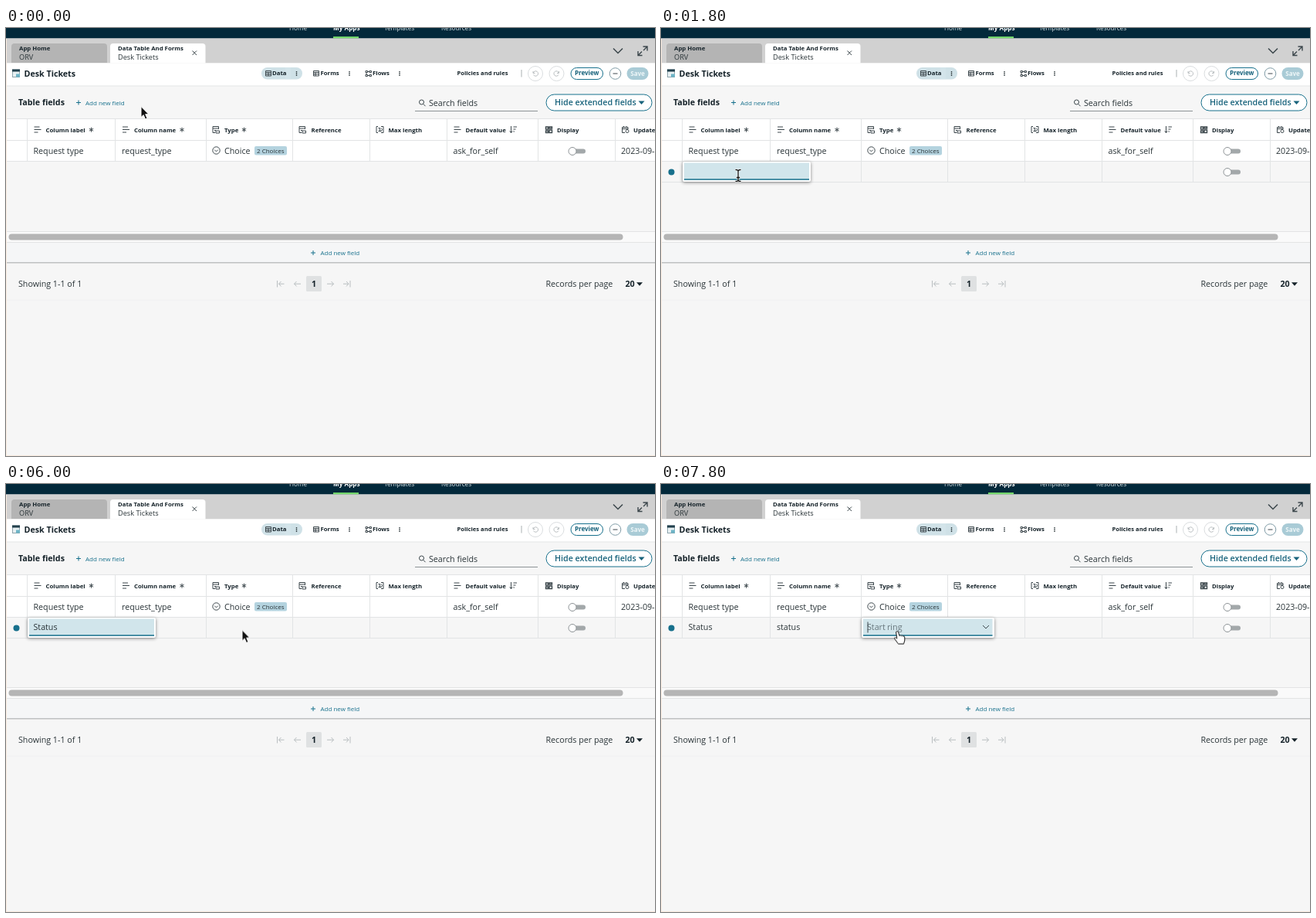
These frames come from a looping animation (841 by 554 pixels, 8000 ms). An HTML page:

```html
<!DOCTYPE html>
<html lang="en">
<head>
<meta charset="utf-8">
<title>Table fields</title>
<style>
html, body { margin: 0; width: 100%; height: 100%; overflow: hidden; background: #f6f6f6; }
svg { display: block; }
text { font: 10.7px "Open Sans", "Noto Sans", sans-serif; fill: #2a3438; white-space: pre; }
.bold { font-weight: 700; fill: #16232a; }
.semi { font-weight: 600; }
.small { font-size: 7.8px; }
.link, .link text { font-size: 8px; fill: #17708c; }
.tab { font-size: 9.2px; }
.nav { font-size: 8.2px; fill: #d5dfe3; }
.line { fill: none; stroke: #3c474c; stroke-width: 1; }
.teal { stroke: #17708c; }
.pale { stroke: #b9bec0; }
.grid { fill: none; stroke: #e2e4e5; }
.lift { filter: drop-shadow(0 1px 2px #0007); }

/* every part shares one 8 s clock; 2.5% is one 200 ms tick */
.anim, .pointer { animation: 8s step-end infinite; }
.row { animation-name: row; }
.label-box { animation-name: label-box; }
.label-caret { animation-name: label-caret; }
.st { animation-name: st; }
.at { animation-name: at; }
.u { animation-name: u; }
.e { animation-name: e; }
.s { animation-name: s; }
.type-box { animation-name: type-box; }
.type-caret { animation-name: type-caret; }
.hint { animation-name: hint; }
.picked { animation-name: picked; }
.loading { animation-name: loading; }
.name { animation-name: name; }
.arrow { animation-name: arrow; }
.hand { animation-name: hand; }
.beam { animation-name: beam; }
.pointer { animation-name: pointer; }
.spin { animation: spin .8s steps(4) infinite; }

@keyframes row { 0% { visibility: hidden } 15% { visibility: visible } }
@keyframes label-box { 0% { visibility: hidden } 15% { visibility: visible } 80%, 100% { visibility: hidden } }
@keyframes label-caret { 0% { visibility: hidden } 15% { visibility: visible } 22.5%, 100% { visibility: hidden } }
@keyframes st { 0% { visibility: hidden } 27.5% { visibility: visible } }
@keyframes at { 0% { visibility: hidden } 32.5% { visibility: visible } }
@keyframes u { 0% { visibility: hidden } 40% { visibility: visible } }
@keyframes e { 0% { visibility: hidden } 45% { visibility: visible } 55%, 100% { visibility: hidden } }
@keyframes s { 0% { visibility: hidden } 60% { visibility: visible } }
@keyframes type-box { 0% { visibility: hidden } 80% { visibility: visible } }
@keyframes type-caret { 0% { visibility: hidden } 80% { visibility: visible } 87.5% { visibility: hidden } 92.5% { visibility: visible } }
@keyframes hint { 0% { visibility: hidden } 80% { visibility: visible } 97.5%, 100% { visibility: hidden } }
@keyframes picked { 0% { visibility: hidden } 97.5% { visibility: visible } }
@keyframes loading { 0% { visibility: hidden } 80% { visibility: visible } 92.5%, 100% { visibility: hidden } }
@keyframes name { 0% { visibility: hidden } 92.5% { visibility: visible } }
@keyframes arrow {
  0% { visibility: visible } 10% { visibility: hidden }
  17.5% { visibility: visible } 22.5% { visibility: hidden }
  67.5% { visibility: visible } 80%, 100% { visibility: hidden }
}
@keyframes hand {
  0% { visibility: hidden } 10% { visibility: visible } 17.5% { visibility: hidden } 95% { visibility: visible }
}
@keyframes beam {
  0% { visibility: hidden } 22.5% { visibility: visible } 27.5% { visibility: hidden }
  65% { visibility: visible } 67.5% { visibility: hidden }
  80% { visibility: visible } 95%, 100% { visibility: hidden }
}
@keyframes pointer {
  0% { transform: translate(175px, 103px) }
  2.5% { transform: translate(175px, 103px); animation-timing-function: steps(4, start) }
  12.5% { transform: translate(141px, 94px) }
  17.5% { transform: translate(141px, 94px); animation-timing-function: steps(3, start) }
  25% { transform: translate(100px, 191px) }
  65% { transform: translate(144px, 198px) }
  67.5% { transform: translate(144px, 198px); animation-timing-function: steps(4, start) }
  77.5%, 100% { transform: translate(306px, 190.5px) }
}
@keyframes spin { to { transform: rotate(360deg) } }
</style>
</head>
<body>
<svg width="841" height="554" viewBox="0 0 841 554">
  <defs>
    <path id="lines" class="line" d="M0 1H7M0 4.500H9M0 8H5"/>
    <path id="star" class="line" d="M0-3V3M-2.600-1.500 2.600 1.500M-2.600 1.500 2.600-1.500"/>
    <path id="form" class="line" d="M1 .5H8.500V4M1 .5V8.500H4M1 3H8.500M3 5.500H5M5 6H9.500V9H5Z"/>
    <path id="dots" d="M0-3v1.400M0-.7v1.400M0 1.600v1.400" stroke="#2a3438" stroke-width="1.400"/>
    <path id="plus" class="line teal" d="M-3 0H3M0-3V3"/>
    <path id="down" d="M-4-2H4L0 2.500Z"/>
    <g id="toggle">
      <rect x="2" y="-3" width="20" height="6" rx="3" fill="#a3a8aa"/>
      <circle cx="5" r="5" fill="#fff" stroke="#8c9295"/>
    </g>
  </defs>

  <!-- top bar and tabs -->
  <rect width="841" height="554" fill="#f6f6f6"/>
  <rect width="841" height="13.500" fill="#03293b"/>
  <text class="nav" x="367" y="3">Home</text>
  <text class="nav bold" x="424" y="3" style="fill:#fff">My Apps</text>
  <text class="nav" x="490" y="3">Templates</text>
  <text class="nav" x="564" y="3">Resources</text>
  <rect x="424" y="11" width="33" height="2.500" fill="#73d66b"/>
  <rect y="13.500" width="841" height="32" fill="#d1d1d1"/>
  <path d="M7 45V24q0-4 4-4H127q4 0 4 4V45Z" fill="#b4b4b4"/>
  <path d="M135 45.500V24q0-4 4-4H254.500q4 0 4 4V45.500Z" fill="#fff"/>
  <text class="bold small" x="17" y="29">App Home</text>
  <text class="tab" x="17" y="40.500">ORV</text>
  <text class="bold small" x="145" y="29">Data Table And Forms</text>
  <text class="tab" x="145" y="40.500">Desk Tickets</text>
  <path class="line" d="M241.500 29.500l5.500 5.500m0-5.500l-5.500 5.500"/>
  <path class="line" stroke-width="1.500" d="M787 26.500l6 6 6-6" style="stroke-width:1.500"/>
  <path class="line" d="M825.500 24H831V29.500M831 24L826 29M824.500 35.500H819V30M819 35.500L824 30.500" style="stroke-width:1.400"/>

  <!-- title row -->
  <rect y="45.500" width="841" height="29" fill="#fff"/>
  <path d="M0 75H841" stroke="#e6e7e8"/>
  <rect x="8.500" y="54" width="9" height="9.500" fill="#e8f0f2" stroke="#8fa5ad"/>
  <rect x="8" y="53.500" width="10" height="3" fill="#23414d"/>
  <rect x="13" y="59.500" width="5" height="4" fill="#6db4c6"/>
  <text class="bold" x="23.500" y="63">Desk Tickets</text>
  <rect x="331" y="51" width="53" height="15.500" rx="7.750" fill="#cfe1e7"/>
  <path d="M361.500 51H369V66.500H361.500Z" fill="#dbe9ee" opacity=".35"/>
  <path class="line" d="M336.500 55.500H343.500V62H336.500ZM336.500 57.500H343.500M336.500 59.800H343.500M340 57V62"/>
  <text class="bold small" x="345" y="61.200">Data</text>
  <use href="#dots" x="376.500" y="59"/>
  <path class="line" d="M398.500 55.500H405.500V62H398.500ZM398.500 57.500H405.500M398.500 59.800H405.500M401 57V62"/>
  <text class="bold small" x="407.500" y="61.200">Forms</text>
  <use href="#dots" x="445" y="59"/>
  <path class="line" d="M466 55.500h2.500v2H466ZM471 55.500h2.500v2H471ZM466 60.500h2.500v2H466ZM471 60.500h2.500v2H471ZM468.500 56.500H471M467 57.500V60.500M468.500 61.500H471"/>
  <text class="bold small" x="475" y="61.200">Flows</text>
  <use href="#dots" x="510" y="59"/>
  <text class="bold small" x="584.500" y="61.200" style="font-size:7.600px">Policies and rules</text>
  <path d="M668 54V63.500" stroke="#aab0b2"/>
  <g fill="#fff" stroke="#dadddf"><circle cx="686" cy="59" r="9.500"/><circle cx="713.500" cy="59" r="9.500"/></g>
  <path class="line pale" d="M683 56v2.500h2.500M683.300 58a3.200 3.200 0 1 1 .2 2.500M716.500 56v2.500h-2.500M716.200 58a3.200 3.200 0 1 0-.2 2.500"/>
  <rect x="732" y="51.500" width="41.500" height="15" rx="7.500" fill="#fff" stroke="#17708c"/>
  <text class="bold small" x="737" y="61.300" style="font-size:8px;fill:#17627b">Preview</text>
  <circle cx="789.500" cy="59" r="7.300" fill="#fff" stroke="#7e9aa5"/>
  <path class="line" d="M786.500 59H792.500"/>
  <rect x="804.500" y="51" width="28" height="16" rx="8" fill="#a9cbd6"/>
  <text class="bold small" x="809.300" y="61.500" style="font-size:8px;fill:#eef6f8">Save</text>

  <!-- toolbar -->
  <text class="bold" x="16" y="100">Table fields</text>
  <use href="#plus" x="94" y="96.500"/>
  <text class="link" x="103" y="99.500">Add new field</text>
  <g class="line"><circle cx="538.500" cy="96" r="3"/><path d="M540.700 98.300L543.500 101.200"/></g>
  <text x="548" y="100.500">Search fields</text>
  <path d="M530 107.500H689" stroke="#8c9396"/>
  <rect x="700" y="86" width="137" height="21" rx="10.500" fill="#fff" stroke="#17708c"/>
  <text class="semi" x="711" y="100.300" style="fill:#17627b">Hide extended fields</text>
  <use href="#down" x="823.500" y="96.500" fill="#17627b"/>

  <!-- table -->
  <rect y="118" width="841" height="54.500" fill="#fff"/>
  <path class="grid" d="M0 117.500H841M0 145.500H841M0 172.500H841M27.500 118V172M141.500 118V172M259.500 118V172M371.500 118V172M471.500 118V172M571.500 118V172M689.500 118V172M789.500 118V172"/>
  <use href="#lines" x="36.500" y="127"/>
  <text class="bold small" x="51.500" y="134.500">Column label</text>
  <use href="#star" x="110.500" y="131.700"/>
  <use href="#lines" x="151" y="127"/>
  <text class="bold small" x="166" y="134.500">Column name</text>
  <use href="#star" x="228" y="131.700"/>
  <use href="#form" x="267" y="127"/>
  <text class="bold small" x="283" y="134.500">Type</text>
  <use href="#star" x="308.500" y="131.700"/>
  <use href="#form" x="379" y="127"/>
  <text class="bold small" x="395.500" y="134.500">Reference</text>
  <path class="line" d="M482 127.500H480V135.500H482M486 127.500H489V135.500H486M482.500 129.500h2v4M482.500 133.500h4M486 129.500l1.500 2-1.500 2"/>
  <text class="bold small" x="495.500" y="134.500">Max length</text>
  <use href="#lines" x="580.500" y="127"/>
  <text class="bold small" x="595.500" y="134.500">Default value</text>
  <path class="line" d="M654.500 127V135.500M652.500 133.500l2 2 2-2M657.500 128H662M657.500 131H660.500M657.500 134H659"/>
  <path class="line" d="M699.500 128h3v3h-3ZM704 128h3.500v2H704ZM699.500 133h3v2.500h-3ZM704 132h3.500v3.500H704Z" style="stroke-width:1.400"/>
  <text class="bold small" x="714" y="134.500">Display</text>
  <path class="line" d="M798.500 128.500H806V131M798.500 128.500V135.500H802M798.500 130.500H806M800.500 127V129M804 127V129M807 133.500a2 2 0 1 1-4 0a2 2 0 1 1 4 0"/>
  <text class="bold small" x="813" y="134.500">Updated</text>

  <text x="35.500" y="162.500">Request type</text>
  <text x="150" y="162.500">request_type</text>
  <circle class="line" cx="272.500" cy="158.500" r="4.700"/>
  <path class="line" d="M270.300 157.700l2.200 2.200 2.200-2.200"/>
  <text x="283" y="162.500">Choice</text>
  <rect x="322" y="153" width="42" height="11.500" rx="2" fill="#b4d3df"/>
  <text x="325" y="161.700" style="font-size:8px">2 Choices</text>
  <text x="579.500" y="162.500">ask_for_self</text>
  <use href="#toggle" x="729" y="159.500"/>
  <text x="797" y="162.500">2023-09-</text>

  <!-- scrollbar and footer -->
  <rect y="263" width="841" height="14" fill="#fafafa"/>
  <path d="M0 263.500H841M0 277.500H841" stroke="#e3e4e5"/>
  <rect x="3.500" y="266.500" width="796" height="8" rx="4" fill="#b5b5b5"/>
  <rect y="278" width="841" height="25" fill="#f5f6f7"/>
  <use href="#plus" x="398" y="291"/>
  <text class="link" x="407.500" y="294">Add new field</text>
  <path d="M0 303.700H841" stroke="#bfc1c2" stroke-width="1.500"/>
  <path d="M0 352H841" stroke="#f0f0f1"/>
  <text x="16" y="335">Showing 1-1 of 1</text>
  <path class="line pale" d="M351.500 327V335.500M360.500 331.200H353.500M356.500 328l-3 3.200 3 3.200M382 331.200H373.500M376.500 328l-3 3.200 3 3.200M416 331.200H424.500M421.500 328l3 3.200-3 3.200M437 331.200H444M441 328l3 3.200-3 3.200M446 327V335.500"/>
  <rect x="389" y="321" width="20" height="20" rx="1.500" fill="#dfe1e2"/>
  <text class="bold" x="396" y="335">1</text>
  <text x="699.500" y="335">Records per page</text>
  <text class="bold" x="802.500" y="335">20</text>
  <use href="#down" x="821" y="331.200" fill="#16232a"/>

  <!-- new row -->
  <g class="anim row">
    <path class="grid" d="M0 199.500H841M27.500 173V199M141.500 173V199M259.500 173V199M371.500 173V199M471.500 173V199M571.500 173V199M689.500 173V199M789.500 173V199"/>
    <circle cx="13.500" cy="186.500" r="4" fill="#17708c"/>
    <use href="#toggle" x="729" y="186.500"/>
  </g>
  <g class="anim label-box">
    <rect class="lift" x="28" y="173" width="166" height="26" rx="2" fill="#fff"/>
    <rect x="30" y="174.500" width="162" height="22" fill="#d1e5eb"/>
    <path d="M30 196H192" stroke="#17708c" stroke-width="1.500"/>
  </g>
  <path class="line anim label-caret" d="M36.500 178.500V192.500"/>
  <text x="35.500" y="189"><tspan class="anim st">St</tspan><tspan class="anim at">at</tspan><tspan class="anim u">u</tspan><tspan class="anim e">e</tspan><tspan class="anim s" dx="-.561em">s</tspan></text>
  <g class="anim loading">
    <g transform="translate(245.500 186)"><path class="line teal spin" d="M2.800-2.800A4 4 0 1 0 4 0" style="stroke-width:1.500"/></g>
  </g>
  <text class="anim name" x="150" y="189">status</text>
  <g class="anim type-box">
    <rect class="lift" x="260" y="173" width="172" height="26" rx="2" fill="#fff"/>
    <rect x="262" y="174.500" width="167.500" height="22" fill="#d1e5eb"/>
    <path d="M262 196H429.500" stroke="#17708c" stroke-width="1.500"/>
    <path class="line" d="M417 183l4 4 4-4"/>
  </g>
  <text class="anim hint" x="267" y="189" style="fill:#66757b">Start typing...</text>
  <text class="anim picked" x="267" y="189" style="fill:#66757b">Start<tspan x="293">ring</tspan></text>
  <path class="line anim type-caret" d="M268 178.500V192.500"/>

  <path d="M.5 14V554M0 553.500H841" fill="none" stroke="#f9ebdf"/>

  <!-- mouse pointer -->
  <g class="pointer">
    <path class="anim arrow" d="M0-1.500V12.500L3.200 9.600 5.500 15 8 14 5.700 8.700H10Z" fill="#111" stroke="#fff"/>
    <path class="anim hand" d="M-1.500 1q1.500-2 3 0l1.500 5q1.500-1.500 2.500 0 1.500-1 2.300.5 1.800-.5 2 1.500v4l-1.300 4.500H1.500L-3.500 9.500q0-1.700 2-1l1.300 1Z" fill="#fff" stroke="#111" stroke-linejoin="round"/>
    <g class="anim beam" fill="none" stroke-linecap="round">
      <path id="beam" d="M-3-7.500Q0-7.500 0-5.500Q0-7.500 3-7.500M0-5.500V5.500M-3 7.500Q0 7.500 0 5.500Q0 7.500 3 7.500M-1.700 2.500H1.700" stroke="#fff" stroke-width="2.600"/>
      <path d="M-3-7.500Q0-7.500 0-5.500Q0-7.500 3-7.500M0-5.500V5.500M-3 7.500Q0 7.500 0 5.500Q0 7.500 3 7.500M-1.700 2.500H1.700" stroke="#111" stroke-width="1.300"/>
    </g>
  </g>
</svg>
</body>
</html>
```
